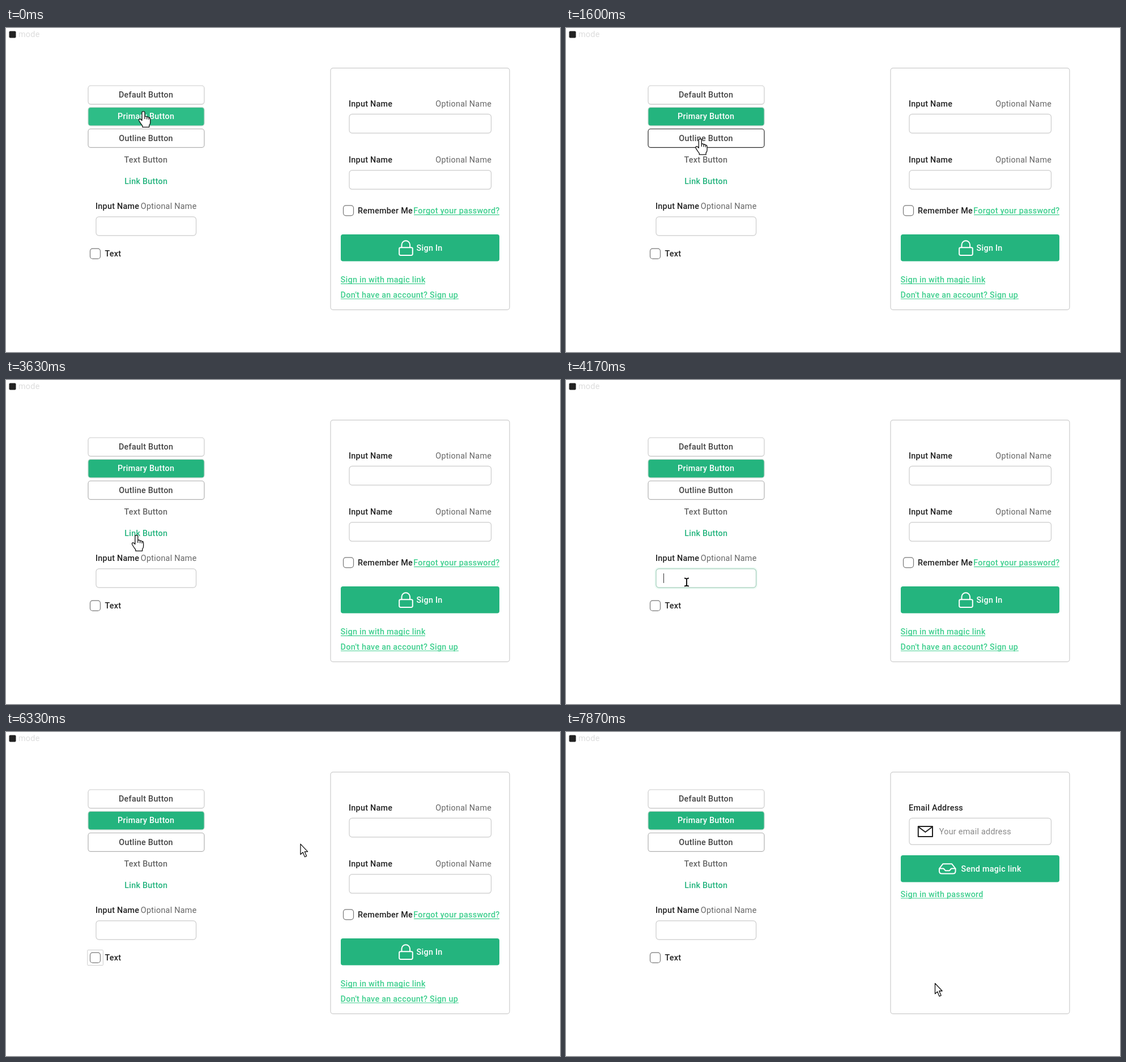
Recreate the animation shown at these times as an HTML page. Size 978x573 px, loop 8 s.

```html
<!DOCTYPE html>
<html lang="en">
<head>
<meta charset="utf-8">
<title>Form widgets</title>
<style>
html, body { margin: 0; width: 100%; height: 100%; overflow: hidden; background: #fff; }
svg { display: block; width: 978px; height: 573px; }
text { font: 14.4px Roboto, sans-serif; letter-spacing: .25px; fill: #666; }
.b { font-weight: 500; fill: #222; }
.btn { font-weight: 500; fill: #444; text-anchor: middle; }
.opt { text-anchor: end; }
.link { font-weight: 500; fill: #3ecf8e; }
.white { fill: #fff; }
.box { fill: #fff; stroke: #ccc; stroke-width: 1.2; }
.check { fill: #fff; stroke: #777; stroke-width: 1.2; }
.under { stroke: #3ecf8e; stroke-width: 1.2; }
.icon { fill: none; stroke: #fff; stroke-width: 2; stroke-linejoin: round; }
.cursor { fill: #fff; stroke: #111; stroke-width: 1.3; stroke-linejoin: round; }
</style>
</head>
<body>
<svg viewBox="0 0 978 573">
  <rect x="5.5" y="5.5" width="12" height="12" rx="2" fill="#222"/>
  <text x="22" y="15.5" style="fill:#ddd">mode</text>

  <rect x="145" y="102.8" width="205" height="33" rx="4.5" fill="#e4e4e4"/>
  <rect class="box" x="145" y="102" width="205" height="32.6" rx="4.5"/>
  <text class="btn" x="247.1" y="123.2">Default Button</text>
  <rect id="primary" x="145" y="140.3" width="205" height="32.6" rx="4.5" stroke="#bcd3c8" stroke-width="1.2"/>
  <text class="btn white" x="247.1" y="161.4">Primary Button</text>
  <rect id="outline" x="145" y="178.5" width="205" height="32.8" rx="4.5" fill="#fff" stroke-width="1.2"/>
  <text class="btn" x="247.1" y="199.6">Outline Button</text>
  <rect id="textBg" x="144" y="215.7" width="207" height="34" rx="4.5" fill="#f5f5f5"/>
  <text id="textLabel" class="btn" x="246.9" y="237.8">Text Button</text>
  <text class="btn" x="247.2" y="276" style="fill:#24b47e">Link Button</text>

  <text class="b" x="158" y="320">Input Name</text>
  <text class="opt" x="336.6" y="320">Optional Name</text>
  <rect id="ring" x="157.8" y="332.6" width="179" height="35.8" rx="6" fill="none" stroke="#3ecf8e" stroke-width="3"/>
  <rect id="field" class="box" x="159" y="333.9" width="176.6" height="33.2" rx="5"/>
  <path id="caret" d="M172.5 342V359" stroke="#333"/>
  <rect id="focusBox" x="143.8" y="385.6" width="27.6" height="27" rx="1" fill="none" stroke="#ccc"/>
  <rect class="check" x="148.5" y="390.2" width="18" height="18" rx="4.5"/>
  <text class="b" x="174.5" y="404.2">Text</text>

  <rect class="box" x="573" y="70.8" width="316" height="427.5" rx="4.5"/>

  <g id="signIn">
    <text class="b" x="605" y="138.6">Input Name</text>
    <text class="opt" x="857.2" y="138.6">Optional Name</text>
    <rect class="box" x="606" y="152.4" width="250.5" height="33.4" rx="5"/>
    <text class="b" x="605" y="237.9">Input Name</text>
    <text class="opt" x="857.2" y="237.9">Optional Name</text>
    <rect class="box" x="606" y="251.6" width="250.5" height="33.6" rx="5"/>
    <rect class="check" x="595.5" y="313.8" width="18" height="18" rx="4.5"/>
    <text class="b" x="621" y="328">Remember Me</text>
    <text class="link" x="719.3" y="328">Forgot your password?</text>
    <path class="under" d="M720 330.3H871"/>
    <rect id="submit" x="591" y="365" width="280" height="47.4" rx="4"/>
    <path class="icon" d="M698.5 388V383.5a7.3 7.3 0 0 1 14.6 0V388M696.5 388.2H715.5a2.3 2.3 0 0 1 2.3 2.3V399.7a2.3 2.3 0 0 1-2.3 2.3H696.5a2.3 2.3 0 0 1-2.3-2.3V390.5a2.3 2.3 0 0 1 2.3-2.3Z"/>
    <text class="b white" x="724.6" y="393.6">Sign In</text>
    <text class="link" x="590.6" y="450">Sign in with magic link</text>
    <text class="link" x="590.6" y="476.6">Don't have an account? Sign up</text>
    <path class="under" d="M591 452.4H740M591 479H799"/>
  </g>

  <g id="magic">
    <text class="b" x="605" y="138.6">Email Address</text>
    <rect class="box" x="606" y="152.4" width="250.5" height="46.8" rx="5"/>
    <path class="icon" style="stroke:#222" d="M621.8 167H647V185H621.8ZM621.8 167.5L634.4 177L647 167.5"/>
    <text x="658.8" y="180.8" style="fill:#888">Your email address</text>
    <rect x="591" y="218" width="280" height="47.4" rx="4" fill="#24b47e"/>
    <path class="icon" d="M659 241.5L665.5 233.2H681L687.6 241.5V246Q687.6 250.6 683 250.6H663.6Q659 250.6 659 246ZM659 241.5H666.5L669.8 245.2H677L680.2 241.5H687.6"/>
    <text class="b white" x="697.6" y="246.6">Send magic link</text>
    <text class="link" x="590.6" y="291.6">Sign in with password</text>
    <path class="under" d="M591 294H736"/>
  </g>

  <g id="pointer">
    <path id="hand" class="cursor" d="M-2.5 2.5Q-2.5 .5 0 .5T2.5 2.5V9.5Q5 8.3 6.3 10.3Q8.7 9.5 9.7 11.5Q12.3 11 12.3 14.5V20Q12.3 23 10.3 25V28.3H-1.5V26Q-4 23-7.3 17.5Q-8.8 14.3-6.5 13.7Q-4.5 13.6-2.5 16.5ZM2.5 9.5V14M6.3 10.3V14.5M9.7 11.5V15"/>
    <path id="arrow" class="cursor" d="M.5.5V19L4.7 15.2L8 23.3L11.2 21.9L7.8 14H13.2Z"/>
    <path id="beam" fill="none" stroke="#111" stroke-width="2" d="M-4-7Q-1-7 0-5.5Q1-7 4-7M0-6V6M-4 7Q-1 7 0 5.5Q1 7 4 7"/>
  </g>
</svg>
<script>
const LOOP = 8000;
const $ = id => document.getElementById(id);
const clamp = v => Math.min(1, Math.max(0, v));
const show = (id, on) => $(id).style.display = on ? '' : 'none';

// Pointer moves: start, end, target x, target y
const moves = [
  [0, 200, 241, 152], [570, 1130, 237, 192], [1570, 2230, 235, 232],
  [2700, 3230, 232, 266], [3600, 4330, 212, 362], [4740, 5270, 157, 402],
  [5900, 6330, 519, 197], [6330, 6730, 604, 313], [6740, 7130, 757, 380],
  [7130, 7410, 690, 405], [7410, 7470, 655, 432], [7470, 7570, 651, 444]
];
// Pointer shape from each time on
const shapes = [
  [0, 'hand'], [745, 'arrow'], [810, 'hand'], [1752, 'arrow'], [1813, 'hand'],
  [2866, 'arrow'], [2928, 'hand'], [3685, 'arrow'], [3930, 'beam'], [4778, 'arrow'],
  [4980, 'hand'], [5915, 'arrow'], [6700, 'hand'], [6780, 'arrow'], [6947, 'hand'],
  [7430, 'arrow'], [7500, 'hand'], [7750, 'arrow']
];

function pointerAt(t) {
  let x = 242.5, y = 147;
  for (const [from, to, tx, ty] of moves) {
    const p = clamp((t - from) / (to - from));
    const e = 1 - (1 - p) ** 2;
    x += (tx - x) * e;
    y += (ty - y) * e;
  }
  return [x, y];
}

const fade = (t, on, off, ms = 300) => clamp((t - on) / ms) - clamp((t - off) / ms);
const mix = (a, b, p) => `rgb(${a.map((v, i) => Math.round(v + (b[i] - v) * p))})`;
const grey = v => [v, v, v];
const green = [36, 180, 126], bright = [66, 208, 154];

function draw(t) {
  $('primary').style.fill = mix(green, bright, fade(t, -100, 745));
  $('outline').style.stroke = mix(grey(176), grey(40), fade(t, 810, 1752));
  const text = fade(t, 1813, 2866);
  $('textBg').style.opacity = text;
  $('textLabel').style.fill = mix(grey(102), grey(68), text);

  const focus = fade(t, 4110, 5090, 210);
  $('field').style.stroke = mix(grey(204), [62, 207, 142], focus);
  $('ring').style.opacity = focus * .3;
  show('caret', t >= 4110 && t < 5090);
  show('focusBox', t >= 5090 && t < 7600);

  $('submit').style.fill = mix(green, bright, fade(t, 6947, 7430));
  show('signIn', t < 7670);
  show('magic', t >= 7670);

  const shape = shapes.filter(s => s[0] <= t).pop()[1];
  for (const id of ['hand', 'arrow', 'beam']) show(id, id === shape);
  $('pointer').setAttribute('transform', `translate(${pointerAt(t)})`);
}

const start = performance.now();
function tick() {
  draw((performance.now() - start) % LOOP);
  requestAnimationFrame(tick);
}
tick();
</script>
</body>
</html>
```
